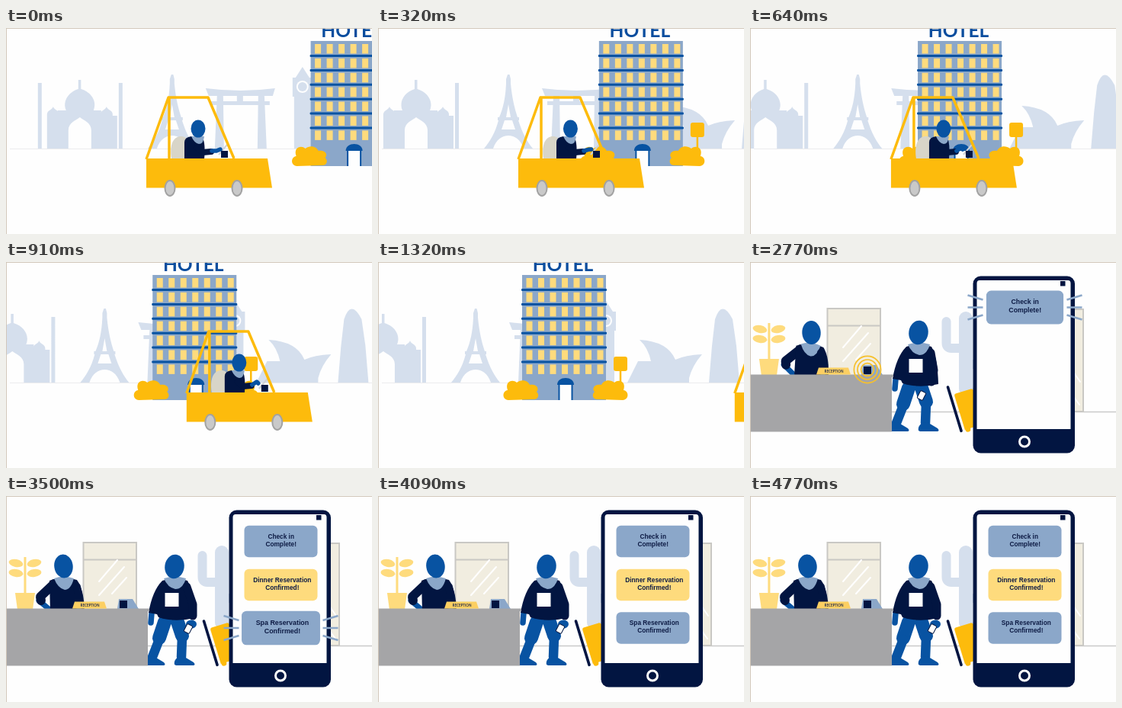
An HTML page that plays this animation: 480 px wide and 270 px high, repeating every 4810 ms.

```html
<!DOCTYPE html>
<html lang="en">
<head>
<meta charset="utf-8">
<title>Hotel check-in</title>
<style>
html, body { margin: 0; width: 100%; height: 100%; overflow: hidden; background: #fefefe; }
svg { display: block; width: 100%; height: 100%; }
.navy { fill: #021541; }
.blue { fill: #0853a2; }
.mid { fill: #8ba7c9; }
.pale { fill: #d5dfed; }
.gold { fill: #fdbb0c; }
.soft { fill: #fedb7d; }
.cream { fill: #f1ede0; stroke: #c9c8c4; stroke-width: 2; }
.glint { stroke: #fff; stroke-width: 2; fill: none; stroke-linecap: round; }
.limb { fill: none; stroke-linecap: round; stroke-linejoin: round; }
.sleeve { stroke: #021541; stroke-width: 11; }
.skin { stroke: #0853a2; }
.note { font: bold 8.3px "Liberation Sans", Arial, sans-serif; fill: #0e1c45; text-anchor: middle; }
</style>
</head>
<body>
<svg id="stage" viewBox="0 0 480 270">
  <rect width="480" height="270" fill="#fefefe"/>

  <g id="street">
    <path d="M5 158.500H480" stroke="#ebebee"/>
    <g id="skyline" class="pale">
      <path d="M42 72h5v86h-5zM148 72h5v86h-5zM54 158V115H68V108H79C74 96 82 84 95 80V68H98.500V80C112 84 120 96 115 108H125V115H146V158H112V134C112 124 102 121 97 117C92 121 82 124 82 134V158Z"/>
      <path d="M54 115C53 107 61 108 62 103C63 108 71 107 70 115ZM124 115C123 107 131 108 132 103C133 108 141 107 140 115Z"/>
      <path d="M217 61h2.500l1.500 6v6C223 93 226 105 230 117H232V121H231C236 137 243 150 250 158H238C234 146 226 141 218 141C210 141 202 146 198 158H186C193 150 201 137 205 121H204V117H206C211 105 214 93 215 73V67ZM213 121L209 133H227L223 121ZM215 117H221L218 100Z" fill-rule="evenodd"/>
      <path d="M262 79Q308 85 353 79L350 89H266ZM269 96H346V101H269ZM277 88H285L286 158H274ZM331 88H339L342 158H330ZM303 88h8v9h-8z"/>
      <path d="M389 51L398 65H402V90H400V158H378V90H376V65H380Z"/>
      <circle cx="389" cy="77" r="8" fill="#fefefe"/><circle cx="389" cy="77" r="6"/>
      <path d="M417 158L431 130H448Q444 112 433 102Q470 104 480 128Q493 122 515 121Q502 136 498 152V158Z"/>
      <path d="M524 158L528 110L532 75Q541 48 555 75L560 110L564 158Z"/>
    </g>
    <g id="hotel">
      <path d="M318 140V162" stroke="#fdbb0c" stroke-width="2.500"/>
      <rect class="gold" x="309" y="124" width="18" height="19" rx="3"/>
      <rect class="mid" x="189" y="17" width="110" height="164"/>
      <g id="floors"></g>
      <path d="M237.500 181V160H254.500V181" fill="#fefefe" stroke="#0853a2" stroke-width="2"/>
      <path class="blue" d="M235 161C235 149 257 149 257 161Z"/>
      <path id="bush" class="gold" d="M171 181C162 180 163 169 170 168C166 157 176 153 182 158C188 153 197 155 199 161C208 159 212 166 208 170C213 175 209 181 203 180Z"/>
      <use href="#bush" transform="translate(492 0) scale(-1 1)"/>
      <text x="242.500" y="11.500" text-anchor="middle" font-family="Lato, sans-serif" font-weight="700" font-size="24.500" fill="#0a4d9e">HOTEL</text>
    </g>
    <g id="car">
      <path d="M217 171C214 150 221 141 231 142Q243 143 240 171Z" fill="#d8d5c8"/>
      <path class="navy" d="M234 172V150Q234 143 243 142H257Q262 150 260 172Z"/>
      <path class="mid" d="M243 142H260Q259 152 253 152Q247 151 243 142Z"/>
      <ellipse id="driver" class="blue" cx="252" cy="132" rx="9.500" ry="11.500"/>
      <path d="M279 166L290 153" stroke="#cfd2d6" stroke-width="2"/>
      <path class="limb sleeve" d="M251 157L258 163L269 162" style="stroke-width:8"/>
      <path id="grip" class="limb skin" stroke-width="5.500"/>
      <rect class="navy" x="282" y="161" width="9" height="9"/>
      <path d="M184 172L213 91H265L299 171M214 91V171" fill="none" stroke="#fdbb0c" stroke-width="3.500" stroke-linejoin="round"/>
      <path class="gold" d="M184 171H343L349 209.500H184Z"/>
      <g fill="#c9c9c9" stroke="#a2a2a2" stroke-width="2">
        <ellipse cx="215" cy="210" rx="6.500" ry="10"/><ellipse cx="303" cy="210" rx="6.500" ry="10"/>
      </g>
    </g>
  </g>

  <g id="lobby">
    <path d="M186 196.500H480" stroke="#c9c9c9" stroke-width="1.300"/>
    <g class="cream"><rect x="101.500" y="61" width="69.500" height="90"/><path d="M101.500 83.500H171"/></g>
    <path class="glint" d="M122 112L146 84M122 130L155 93M139 128L158 107"/>
    <g class="pale">
      <path class="limb" d="M283 74V185M257.500 78V106Q257.500 113 264 113H283M310 116V127Q310 134 303 134H283" stroke="#d5dfed" stroke-width="12"/>
      <rect x="274" y="65" width="18" height="110" rx="9"/><path d="M276 165H300L297 197H279Z"/>
    </g>
    <rect x="345" y="62" width="92" height="134" fill="#fdd873"/>
    <g id="doorL"><rect class="cream" x="345" y="62" width="46" height="134"/><path class="glint" d="M352 119L377 83M349 152L381 108"/></g>
    <g id="doorR"><rect class="cream" x="391" y="62" width="46" height="134"/><path class="glint" d="M401 145L432 187M403 114L433 157"/></g>
    <rect x="345" y="62" width="92" height="134" fill="none" stroke="#c9c8c4" stroke-width="2"/>

    <g class="soft">
      <path d="M12 127H38L35 149H15Z"/><path d="M25 80V128" stroke="#fedb7d" stroke-width="3"/>
      <g id="leaves"></g>
    </g>
    <g id="clerk">
      <path class="limb skin" d="M43 137L55 147" stroke-width="7"/>
      <path class="limb sleeve" d="M63 115L45 132L46 137" style="stroke-width:12"/>
      <path class="navy" d="M57 111Q75 104 93 110Q102 122 103 150H58Z"/>
      <path class="mid" d="M63 108Q75 103 89 108Q85 123 77 123Q68 121 63 108Z"/>
      <ellipse class="blue" cx="75.500" cy="92" rx="12.200" ry="15.500" transform="rotate(-8 75.500 92)"/>
    </g>
    <path id="clerkArm" class="limb sleeve" style="stroke-width:10"/>
    <path id="clerkHand" class="limb skin" stroke-width="6"/>
    <g id="reader">
      <path class="mid" d="M148 135H166L174 148H146Z"/>
      <rect class="navy" x="149" y="137" width="10" height="10"/>
    </g>

    <g id="guest">
      <g id="bag">
        <path class="gold" d="M5 14Q5 11 8 11H27Q31 11 31 15L27 56Q26 60 22 60H5Z"/>
        <circle class="gold" cx="9" cy="60.500" r="3.500"/>
        <path d="M0 0V60" stroke="#021541" stroke-width="3.600" stroke-linecap="round"/>
      </g>
      <g class="limb skin">
        <path id="thighs" stroke-width="18"/><path id="shins" stroke-width="12.500"/>
      </g>
      <path id="footA" class="blue" d="M-8 4C-10 -5 2 -10 7 -5L17 1Q20 4 17 5H-6Z"/>
      <use id="footB" href="#footA"/>
      <g id="torso">
        <path class="limb skin" d="M191 154L190 166" stroke-width="7.500"/>
        <path class="navy" d="M205 111Q221 105 238 111Q246 125 247 160Q221 166 200 159L198 155L187 153Q192 124 205 111Z"/>
        <path class="mid" d="M207 108Q221 103 236 108Q232 122 222 122Q212 120 207 108Z"/>
        <ellipse class="blue" cx="221" cy="92.500" rx="12.700" ry="15.800" transform="rotate(8 221 92.500)"/>
        <rect x="208.500" y="127" width="18" height="18" fill="#fefefe"/>
      </g>
      <path id="arm" class="limb sleeve"/>
      <g id="hand">
        <ellipse class="blue" rx="7" ry="5.500"/>
        <rect id="mobile" x="-4" y="-5.500" width="8" height="11" rx="1.500" fill="#fefefe" stroke="#021541"/>
      </g>
    </g>
    <path d="M0 147.500H188V151H186V222.500H0Z" fill="#a5a5a7"/>
    <path d="M90 138.500H129L132 147.500H87Z" fill="#fccf62"/>
    <text x="110" y="145" text-anchor="middle" font-family="Open Sans, sans-serif" font-weight="600" font-size="4.600" fill="#14244d">RECEPTION</text>
    <g id="rings" fill="none" stroke="#f6c02c" stroke-width="1.700"></g>

    <g id="phone">
      <rect class="navy" x="292.500" y="18.500" width="133.500" height="232" rx="10"/>
      <path d="M301 24H417Q420.500 24 420.500 28V219H297.500V28Q297.500 24 301 24Z" fill="#fefefe"/>
      <rect class="navy" x="407" y="25" width="6.500" height="6.500"/>
      <circle cx="360" cy="235.500" r="6.500" fill="none" stroke="#fefefe" stroke-width="3"/>
    </g>
    <g id="notes"></g>
  </g>
  <path d="M0 .5H480M.5 0V270" stroke="#d2c8bb" fill="none"/>
</svg>
<script>
const LOOP = 4810, CUT = 1480, STOP = 1040;
const $ = id => document.getElementById(id);
const set = (id, name, value) => $(id).setAttribute(name, value);
const move = (id, value) => set(id, "transform", value);
const clamp = x => Math.max(0, Math.min(1, x));
const smooth = x => x * x * (3 - 2 * x);
const lerp = (a, b, k) => a + (b - a) * k;
const line = p => "M" + p.map(v => v.toFixed(2)).join(" ");

// Eased value from [time, value] stops
function key(t, ...stops) {
  if (t <= stops[0][0]) return stops[0][1];
  for (let i = 1; i < stops.length; i++) {
    const [t0, a] = stops[i - 1], [t1, b] = stops[i];
    if (t < t1) return lerp(a, b, smooth((t - t0) / (t1 - t0)));
  }
  return stops[stops.length - 1][1];
}
const mix = (a, b, k) => a.map((v, i) => lerp(v, b[i], k));
const about = (x, y, s) => `translate(${x} ${y}) scale(${s}) translate(${-x} ${-y})`;

let floors = "";
for (let r = 0; r < 7; r++) {
  const y = 21 + r * 18.9;
  for (let c = 0; c < 7; c++)
    floors += `<rect class="soft" x="${194.5 + c * 15.5}" y="${y}" width="8" height="12.5"/>`;
  if (r < 6) floors += `<rect class="blue" x="188" y="${y + 14}" width="112" height="3" rx="1"/>`;
}
$("floors").innerHTML = floors;

$("leaves").innerHTML = [[13, 88, 12], [37, 88, -12], [13, 101, 8], [37, 101, -8]]
  .map(([x, y, a]) => `<ellipse cx="${x}" cy="${y}" rx="9.5" ry="5" transform="rotate(${a} ${x} ${y})"/>`).join("");
$("rings").innerHTML = '<circle cx="154" cy="141"/>'.repeat(3);

const notes = [
  { x: 360.7, y: 59.5, at: 2570, color: "#8ba7c9", text: ["Check in", "Complete!"] },
  { x: 362.3, y: 116.5, at: 2950, color: "#fedb7d", text: ["Dinner Reservation", "Confirmed!"] },
  { x: 362.3, y: 173, at: 3330, color: "#8ba7c9", text: ["Spa Reservation", "Confirmed!"] }
];
$("notes").innerHTML = notes.map(({ x, y, color, text }, i) => `
  <g id="note${i}"><rect x="312.5" y="${y - 20.8}" width="96" height="41.6" rx="6" fill="${color}"/>
  <text class="note" x="${x}" y="${y - 3.8}">${text[0]}</text>
  <text class="note" x="${x}" y="${y + 6.4}">${text[1]}</text></g>
  <path id="burst${i}" stroke="${color}" stroke-width="2.6" fill="none"/>`).join("");

function drawStreet(t) {
  const k = 1 - (1 - clamp(t / STOP)) ** 2;
  move("skyline", `translate(${-90 * k} 0)`);
  move("hotel", `translate(${211 * (1 - k)} 0)`);
  move("car", `translate(${283 * (Math.max(0, t - 600) / 720) ** 2} 0)`);
  const lift = key(t, [100, 0], [600, 1]);
  set("driver", "cx", 252 + lift);
  set("grip", "d", line([270, 161, 276, 161 - 4 * lift, 281 - 3 * lift, 159]));
}

function drawGuest(t) {
  const far = 150 * (1 - clamp((t - CUT) / 340)) ** 1.5;
  const step = Math.sin(far / 12) * 9 * clamp(far / 15);
  const lean = key(t, [1680, 0], [1900, 1], [2080, 1], [2500, 0]);
  const reach = key(t, [1660, 0], [1900, 1], [2080, 1], [2560, 0]);
  const low = key(t, [2080, 0], [2500, 1], [2800, 1], [3200, 0]);
  move("guest", `translate(${far} 0)`);
  move("torso", `translate(${-8 * lean} 0) rotate(${-5 * lean} 219 160)`);
  move("bag", `translate(${259.5 + 1.5 * lean} 164) rotate(${-17 + lean})`);

  const hip = -6 * lean, kneeA = 201 + step / 2 - 2 * lean, kneeB = 231 - step / 2 - 2 * lean;
  set("thighs", "d", line([208 + hip, 165, kneeA, 186]) + line([225 + hip, 165, kneeB, 183]));
  set("shins", "d", line([kneeA, 188, 192 + step, 211]) + line([kneeB, 185, 230 - step, 211]));
  move("footA", `translate(${190 + step} 217)`);
  move("footB", `translate(${39 - 2 * step} 0)`);

  const rest = mix([237, 119, 245, 142, 245, 157], [237, 119, 241, 142, 238, 157], low);
  set("arm", "d", line(mix(rest, [204, 122, 188, 138, 175, 140], reach)));
  const palm = mix([243, 168], [228, 171], low), tip = mix([239, 174], [225, 175], low);
  const hand = mix(palm, [165, 141], reach), end = mix(tip, [154, 138], reach);
  move("hand", `translate(${hand})`);
  move("mobile", `translate(${end[0] - hand[0]} ${end[1] - hand[1]}) rotate(${lerp(28, -24, reach)})`);
}

function drawClerk(t) {
  const give = key(t, [1600, 0], [1880, 1], [2080, 1], [2400, 0]);
  move("clerk", `rotate(${key(t, [2080, 0], [2500, 5], [2820, 5], [3250, 0])} 72 150)`);
  set("clerkArm", "d", line(mix([93, 119, 96, 133, 96, 146], [88, 117, 112, 131, 135, 141], give)));
  set("clerkHand", "d", line(mix([96, 148, 95, 149], [138, 142, 147, 143], give)));
}

function drawNote({ y, at }, i, t) {
  const age = t - at;
  move("note" + i, about(360.5, y, key(age, [0, 0], [140, 1.08], [300, 1])));
  const out = clamp((age - 70) / 80), back = clamp((age - 220) / 120);
  let d = "";
  if (age > 90 && age < 340) for (const side of [-1, 1]) for (const row of [-1, 0, 1]) {
    const spot = k => `${360.5 + side * lerp(55, 75, k)} ${y + row * lerp(10, 16, k)}`;
    d += `M${spot(back)}L${spot(out)}`;
  }
  set("burst" + i, "d", d);
}

function drawLobby(t) {
  // Doors slide behind their own frame
  const gap = key(t, [CUT, 34], [2030, 0]) + 3 * clamp((2000 - t) / 50);
  for (const [id, edge] of [["doorL", 345], ["doorR", 437]])
    move(id, `translate(${edge} 0) scale(${1 - gap / 46} 1) translate(${-edge} 0)`);
  drawClerk(t);
  drawGuest(t);
  set("reader", "opacity", clamp((t - 2030) / 60));
  set("rings", "opacity", clamp((t - 2030) / 60) * clamp((2900 - t) / 80));
  [...$("rings").children].forEach((c, i) => {
    c.setAttribute("r", 8.4 + i * 4.6 + Math.sin((t - 2770) / 75));
  });
  move("phone", about(359, 134.5, key(t, [2090, 0], [2245, 1.065], [2400, 1])));
  notes.forEach((n, i) => drawNote(n, i, t));
}

function draw(t) {
  const inside = t >= CUT;
  set("street", "display", inside ? "none" : "inline");
  set("lobby", "display", inside ? "inline" : "none");
  (inside ? drawLobby : drawStreet)(t);
}

function tick() {
  draw(performance.now() % LOOP);
  requestAnimationFrame(tick);
}
tick();
</script>
</body>
</html>
```
